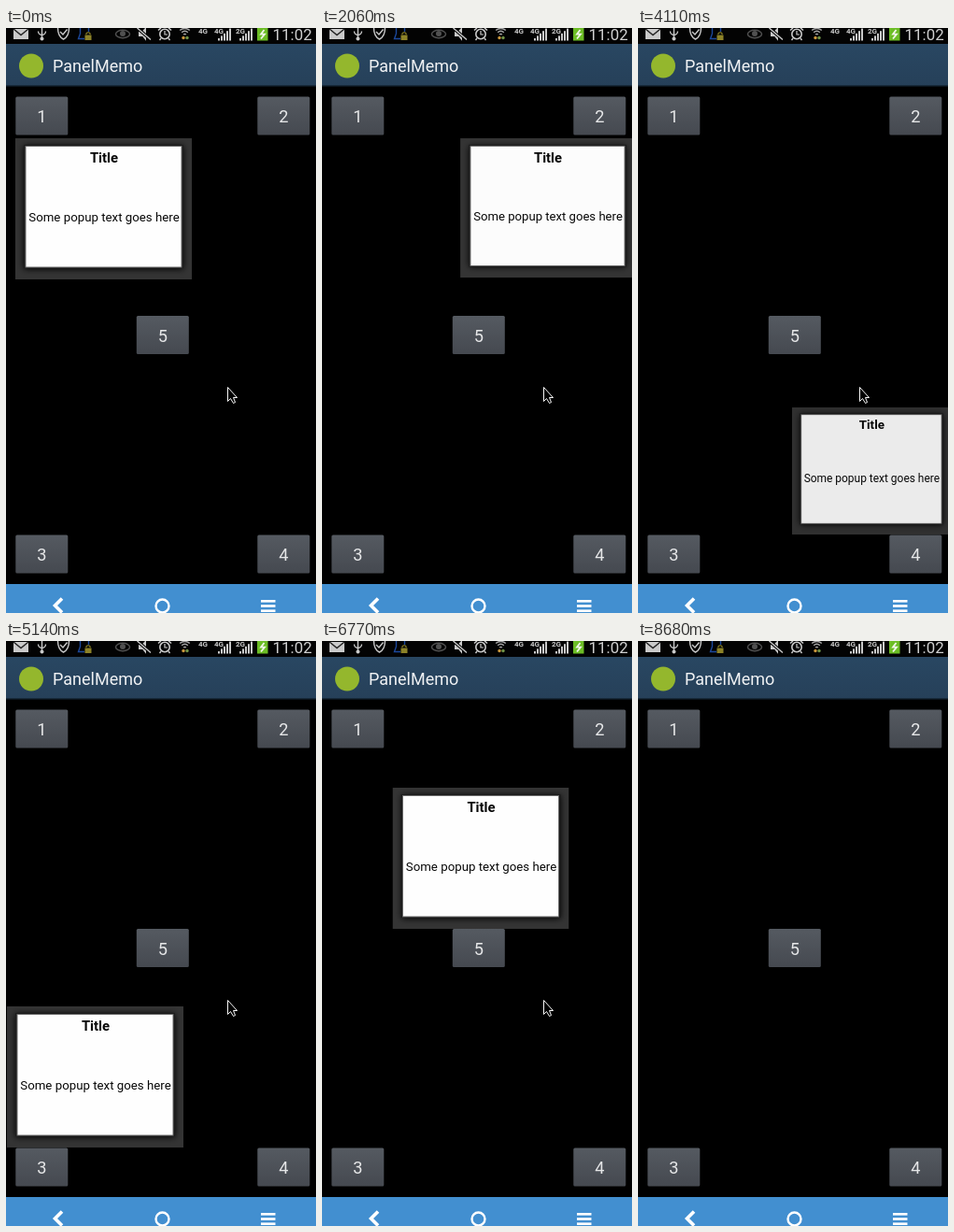
Recreate the animation shown at these times as an HTML page with a canvas. Size 332x626 px, loop 9.27 s.

```html
<!DOCTYPE html>
<html lang="en">
<head>
<meta charset="utf-8">
<title>Popup windows</title>
<style>
html, body { margin: 0; width: 100%; height: 100%; overflow: hidden; background: #000; }
canvas { display: block; width: 332px; height: 626px; }
</style>
</head>
<body>
<canvas id="stage" width="332" height="626"></canvas>
<script>
const c = document.getElementById('stage').getContext('2d');
const LOOP = 9270, TICK = LOOP / 63;
const FONT = 'Roboto, "Open Sans", sans-serif';
const GREY = '#cacaca', BLUE = '#1c489c';
const BTN_W = 56, BTN_H = 41, POP_W = 189, POP_H = 151;
const PRESS = 100, GROW = 300, SHRINK = 180;

// col and row place the button and give the corner its popup scales from
const buttons = [
  { col: 0, row: 0, popX: 10, open: -GROW, close: 350 },
  { col: 1, row: 0, popX: 146, open: 1250, close: 2018 },
  { col: 0, row: 1, popX: 1, open: 4780, close: 5500 },
  { col: 1, row: 1, popX: 146, open: 3050, close: 3993 },
  { col: .5, row: .5, popX: 75.5, open: 6400, close: 7415 }
];
for (const b of buttons) {
  b.x = 10.3 + 259 * b.col;
  b.y = 73.5 + 469 * b.row;
  b.popY = Math.floor(b.row ? b.y - POP_H : b.y + BTN_H + 4);
}

const clamp = v => Math.min(1, Math.max(0, v));

function rect(x, y, w, h, fill) {
  c.fillStyle = fill;
  c.fillRect(x, y, w, h);
}

function text(str, x, y, size, color, align = 'left', weight = 400) {
  c.font = `${weight} ${size}px ${FONT}`;
  c.textAlign = align;
  c.fillStyle = color;
  c.fillText(str, x, y);
}

function stroke(color, width) {
  c.strokeStyle = color;
  c.lineWidth = width;
  c.stroke();
}

function line(points, color = GREY, width = 1.4) {
  c.beginPath();
  points.forEach(p => c.lineTo(...p));
  stroke(color, width);
}

function ring(x, y, r, color = GREY, width = 1.5, from = 0, to = Math.PI * 2) {
  c.beginPath();
  c.arc(x, y, r, from, to);
  stroke(color, width);
}

function dot(x, y, r, fill = GREY) {
  c.beginPath();
  c.arc(x, y, r, 0, Math.PI * 2);
  c.fillStyle = fill;
  c.fill();
}

function gradient(y, h, top, bottom) {
  const g = c.createLinearGradient(0, y, 0, y + h);
  g.addColorStop(0, top);
  g.addColorStop(1, bottom);
  return g;
}

function label4G(str, x, bars) {
  text(str, x, 6, 8, GREY, 'left', 700);
  for (let i = 0; i < bars; i++) rect(x + 4 + i * 3, 11 - i * 2.6, 2, 2.5 + i * 2.6, GREY);
}

function statusBar() {
  rect(0, 0, 332, 17, '#030303');
  // mail
  rect(8, 1, 16, 11, GREY);
  line([[8, 1], [16, 7.5], [24, 1]], '#222');
  // usb
  line([[38.5, 0], [38.5, 12]]);
  ring(38.5, 3.5, 4, GREY, 1.4, 0, Math.PI);
  dot(38.5, 11.5, 2);
  // shield with tick
  c.beginPath();
  c.moveTo(55.5, 0);
  c.quadraticCurveTo(55.5, 9, 61.5, 12);
  c.quadraticCurveTo(67.5, 9, 67.5, 0);
  stroke(GREY, 1.4);
  line([[58, 4], [61, 7], [65.5, 1.5]]);
  // blue outline with padlock
  line([[79.5, 0], [79.5, 6], [77.5, 11.5], [84, 11.5]], BLUE);
  line([[88.5, 0], [88.5, 4]], BLUE);
  rect(84.5, 7.5, 7, 5.5, '#8c8228');
  ring(88, 7, 2.2, '#8c8228', 1.1, Math.PI, 0);
  // eye
  c.beginPath();
  c.ellipse(125, 6.5, 7.5, 4.2, 0, 0, Math.PI * 2);
  stroke('#505050', 1.5);
  dot(125, 6, 3, '#505050');
  // muted speaker
  rect(142, 4, 4, 5, GREY);
  line([[145, 6], [149, 1.5], [149, 11], [145, 6]], GREY, 2);
  line([[140.5, 0], [155, 12.5]], '#030303', 3.4);
  line([[140.5, 0], [155, 12.5]]);
  // alarm
  ring(170, 6.5, 5.2, GREY, 1.6);
  line([[170, 3], [170, 7], [173, 7]], GREY, 1.2);
  for (const s of [-1, 1]) {
    line([[170 + 7 * s, 2.5], [170 + 4 * s, 0]], GREY, 1.6);
    line([[170 + 4 * s, 11], [170 + 5.5 * s, 13]]);
  }
  // wifi
  for (const r of [2, 5, 8]) ring(191.5, 8.5, r, '#a5a5a5', 1.5, -2.3, -.85);
  dot(190, 10.5, 1.7, '#c9963c');
  dot(194, 10.5, 1.7, '#719447');
  // radio
  label4G('4G', 206, 0);
  label4G('4G', 223, 5);
  label4G('2G', 246, 5);
  // battery
  rect(269, 0, 11.5, 13.5, '#6cbd25');
  line([[276.5, 2], [273, 6.7], [277, 6.7], [273, 11.5]], '#f0f5e8', 1.8);
  text('11:02', 285.6, 13, 16.9, '#d0d0d0');
}

function chrome() {
  statusBar();
  rect(0, 17, 332, 45, gradient(17, 45, '#294762', '#264059'));
  rect(0, 61, 332, 1.5, '#172939');
  dot(27, 40.5, 13, '#94b72d');
  text('PanelMemo', 50, 47, 18, '#f0f2f4');

  rect(0, 595, 332, 31, '#428fd0');
  line([[60, 610.5], [52.5, 618], [60, 625.5]], '#fff', 3.6);
  ring(167.5, 618.5, 7, '#fff', 2.4);
  for (let i = 0; i < 3; i++) rect(273, 612 + i * 5.2, 15.5, 2.6, '#fff');
}

function button(b, name, t) {
  const down = t >= b.open - PRESS && t < b.open;
  c.beginPath();
  c.roundRect(b.x, b.y, BTN_W, BTN_H, 1.5);
  c.fillStyle = down ? gradient(b.y, BTN_H, '#44708a', '#36617b') : gradient(b.y, BTN_H, '#555a61', '#454950');
  c.fill();
  text(name, b.x + BTN_W / 2, b.y + 27.8, 18.2, '#e6e7e8', 'center');
}

function popup(b, t) {
  const enter = clamp((t - b.open) / GROW);
  const leave = clamp((t - b.close) / SHRINK);
  if (!enter || leave === 1) return;
  const away = Math.max((1 - enter) ** 2, leave ** 2);
  const scale = 1 - .2 * away;
  c.save();
  c.translate(b.popX + b.col * POP_W, b.popY + b.row * POP_H);
  c.scale(scale, scale);
  c.translate(-b.col * POP_W, -b.row * POP_H);
  c.beginPath();
  c.rect(0, 0, POP_W, POP_H);
  c.clip();
  rect(0, 0, POP_W, POP_H, '#343434');
  c.shadowColor = '#000';
  c.shadowBlur = 7;
  c.shadowOffsetY = 1;
  rect(9, 7, 171, 132, '#1c1c1c');
  c.shadowColor = 'transparent';
  rect(10.5, 8, 168, 130.5, '#6b6b6b');
  rect(11.5, 9, 166, 128.5, '#fefefe');
  text('Title', 95, 25.8, 14.9, '#080808', 'center', 700);
  text('Some popup text goes here', 95, 89.3, 13.28, '#080808', 'center');
  rect(0, 0, POP_W, POP_H, `rgba(0, 0, 0, ${.15 * away})`);
  c.restore();
}

function cursor(t) {
  const p = Math.max(0, (t - 8180) / 430);
  c.save();
  c.translate(Math.round(237 + 19.5 * p) + .5, Math.round(384 + 330 * p * p) + .5);
  c.beginPath();
  for (const q of [[0, 0], [0, 15], [3, 12], [6, 17], [8, 16], [6, 11], [10, 11]]) c.lineTo(...q);
  c.closePath();
  c.fillStyle = '#000';
  c.fill();
  stroke('#f8f8f8', 1);
  c.restore();
}

function draw(t) {
  rect(0, 0, 332, 626, '#000');
  chrome();
  buttons.forEach((b, i) => button(b, String(i + 1), t));
  buttons.forEach(b => popup(b, t));
  cursor(t);
}

const start = performance.now();
function tick() {
  const t = (performance.now() - start) % LOOP;
  draw(Math.min(62, Math.floor((t + 10) / TICK)) * TICK);
  requestAnimationFrame(tick);
}
tick();
</script>
</body>
</html>
```
